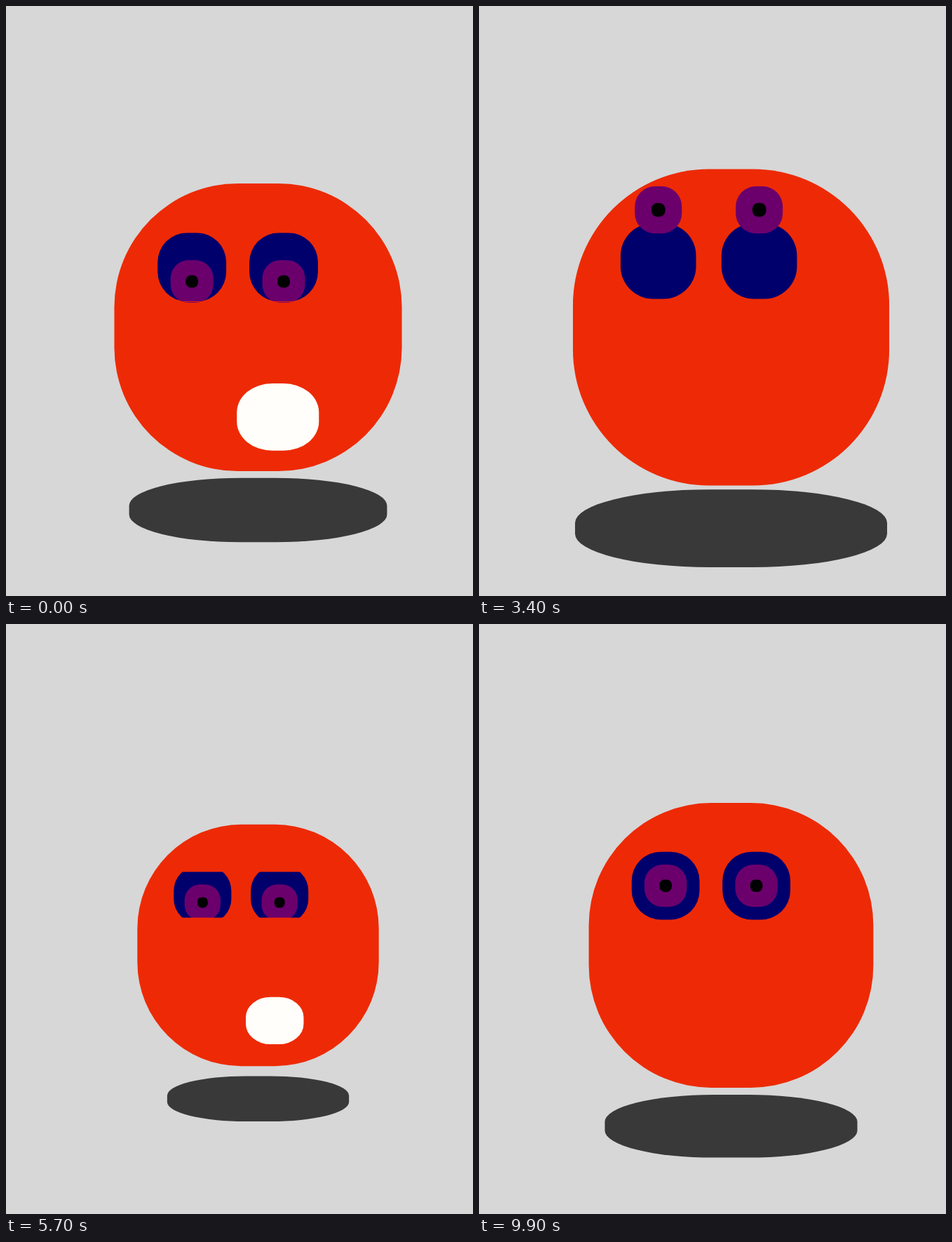
An HTML page with a canvas that plays this animation: 666 by 841 pixels, repeating every 10 s.

```html
<!DOCTYPE html>
<html lang="en">
<head>
<meta charset="utf-8">
<title>Sneezing face</title>
<style>
  html, body { margin: 0; width: 100%; height: 100%; overflow: hidden; background: #d7d7d7; }
  canvas { display: block; }
</style>
</head>
<body>
<canvas id="stage" width="666" height="841"></canvas>
<script>
const ctx = document.getElementById('stage').getContext('2d');

const LOOP = 10000, STEP = 100;
const CENTER = { x: 359.5, y: 458 };
const BODY = 457.3, EYE = 109.1, IRIS = 68, PUPIL = 20;
const EYES_X = [-105.2, 40.7], EYE_Y = -95.7;
const MOUTH = { x: 31.5, y: 142.6, w: 145.5, h: 119 };
const SHADOW_Y = 290.5;
const RED = '#ed2a05', NAVY = '#00006d', PURPLE = '#6b006d';

// Tracks: [time in ms, value] pairs, eased between neighbours
const BREATH = [[0, 1], [5000, 0.7], [10000, 1]];
const GAZE = [[0, 0], [300, 0], [1200, 24.5], [2400, 24.5], [3000, -24.5],
  [3300, -24.5], [3900, -125], [4160, -125], [4760, 0], [6000, 0]];
const BLINK = [[0, 1], [315, 1], [915, 0], [4820, 0], [5100, 1], [6000, 1]];
const HUSH = [[0, 0], [3260, 0], [4160, 1], [4820, 1], [5100, 0], [6000, 0]];

// cubic-bezier(.25, .1, .25, 1)
function ease(x) {
  let lo = 0, hi = 1;
  for (let i = 0; i < 24; i++) {
    const s = (lo + hi) / 2;
    if (0.75 * s * (1 - s) + s ** 3 < x) lo = s; else hi = s;
  }
  const s = (lo + hi) / 2, r = 1 - s;
  return 0.3 * s * r * r + 3 * s * s * r + s ** 3;
}

function sample(track, time) {
  const i = track.findIndex(key => key[0] > time);
  const [t0, v0] = track[i - 1], [t1, v1] = track[i];
  return v0 === v1 ? v0 : v0 + (v1 - v0) * ease((time - t0) / (t1 - t0));
}

function blob(x, y, w, h, color) {
  ctx.fillStyle = color;
  ctx.beginPath();
  ctx.roundRect(x - w / 2, y - h / 2, w, h, { x: w * 0.43, y: h * 0.43 });
  ctx.fill();
}

// Body-coloured lids that close from above and below
function lids(x, y, w, h, closed, pad) {
  if (closed <= 0) return;
  ctx.fillStyle = RED;
  const left = x - w / 2 - pad, width = w + 2 * pad;
  const gap = h / 2 * (1 - closed), reach = h / 2 + 1 - gap;
  if (closed > 0.999) {
    ctx.fillRect(left, y - h / 2 - 1, width, h + 2);
    return;
  }
  ctx.fillRect(left, y - h / 2 - 1, width, reach);
  ctx.fillRect(left, y + gap, width, reach);
}

function draw(t) {
  const s = sample(BREATH, (t - 3090 + LOOP) % LOOP);
  const u = (t + 910) % 6000;
  const gaze = sample(GAZE, u), blink = sample(BLINK, u), hush = sample(HUSH, u);
  const px = x => CENTER.x + x * s, py = y => CENTER.y + y * s;

  ctx.fillStyle = '#d7d7d7';
  ctx.fillRect(0, 0, 666, 841);

  // Shadow and mouth shrink twice as strongly as the body
  const shadow = BODY * s * s;
  blob(CENTER.x, py(SHADOW_Y), shadow, shadow * 0.249, '#393939');
  blob(CENTER.x, CENTER.y, BODY * s, BODY * s, RED);

  for (const ex of EYES_X) {
    const x = px(ex), y = py(EYE_Y), look = py(EYE_Y + gaze);
    blob(x, y, EYE * s, EYE * s, NAVY);
    blob(x, look, IRIS * s, IRIS * s, PURPLE);
    blob(x, look, PUPIL * s, PUPIL * s, '#000');
    lids(x, y, EYE * s, EYE * s, blink, 0);
  }

  const mx = px(MOUTH.x), my = py(MOUTH.y), mw = MOUTH.w * s * s, mh = MOUTH.h * s * s;
  blob(mx, my, mw, mh, '#fffefa');
  lids(mx, my, mw, mh, hush, 1);
}

const start = performance.now();
function tick() {
  const t = (performance.now() - start) % LOOP;
  draw(Math.floor(t / STEP) * STEP);
  requestAnimationFrame(tick);
}
tick();
</script>
</body>
</html>
```
